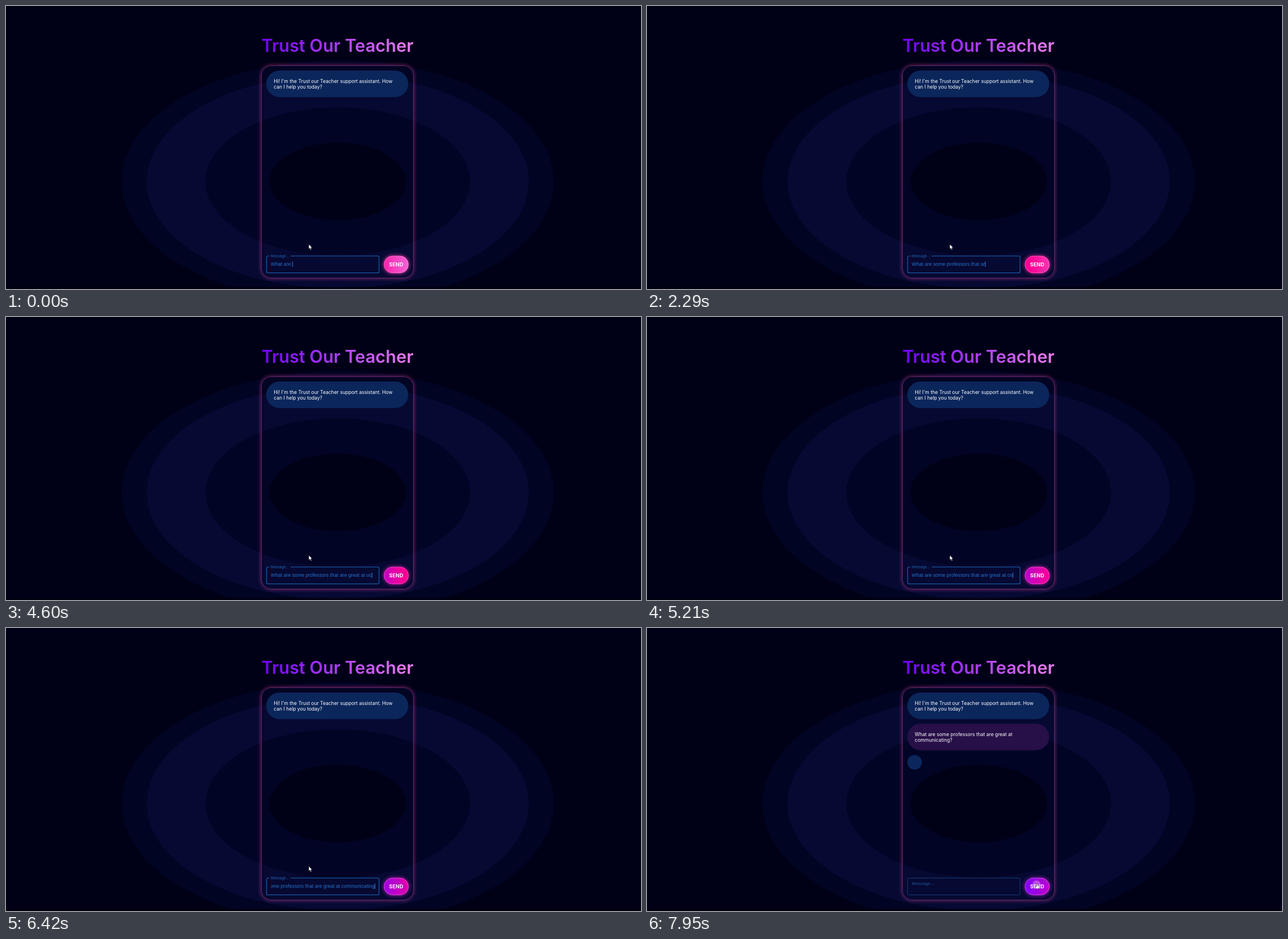
Animation, 1120 px wide and 500 px high, one loop 8000 ms. Source, as an HTML page:

```html
<!DOCTYPE html>
<html lang="en">
<head>
<meta charset="utf-8">
<title>Support chat</title>
<style>
  html, body { margin: 0; width: 100%; height: 100%; overflow: hidden; background: #000117; }
  svg { display: block; width: 1120px; height: 500px; }
  text { white-space: pre; }
  .title { font: 600 30.7px Inter, sans-serif; fill: url(#titleFill); text-anchor: middle; }
  .chat { font: 400 8.53px Inter, sans-serif; fill: #fff; }
  .field { font: 400 8.56px "Liberation Sans", Arial, sans-serif; letter-spacing: .08px; fill: #2872cc; }
  .label { font-size: 6.42px; letter-spacing: .06px; fill: #2062b4; }
  .resting { font-size: 8px; fill: #1d5597; }
  .send { font: 700 8.8px Inter, sans-serif; letter-spacing: .24px; fill: #fff; text-anchor: middle; }

  .flow, .glow, .pointer, .caret, .before, .after, .arrow, .hand { animation: 8s linear infinite; }
  .flow { animation-name: flow; }
  .glow { animation-name: glow; }
  .pointer { animation-name: travel; animation-timing-function: ease-in-out; }
  .caret { animation-name: blink; animation-timing-function: step-end; }
  .before { animation-name: before; animation-timing-function: step-end; }
  .after { animation-name: after; animation-timing-function: step-end; }
  .arrow { animation-name: arrow; animation-timing-function: step-end; }
  .hand { animation-name: hand; animation-timing-function: step-end; }

  @keyframes flow { from { transform: translateX(-112px); } to { transform: translateX(0); } }
  @keyframes glow { from { fill: #ff3fae; } 45% { fill: #f5229f; } to { fill: #b827e6; } }
  @keyframes travel {
    0%, 86% { transform: translate(534px, 421px); }
    89.8%, 91% { transform: translate(508.5px, 404.5px); }
    96.5%, 100% { transform: translate(687.5px, 451.5px); }
  }
  @keyframes blink { 0% { opacity: 1; } 87.5% { opacity: 0; } 93.75% { opacity: 1; } 100% { opacity: 1; } }
  @keyframes before { 0% { opacity: 1; } 99.3%, 100% { opacity: 0; } }
  @keyframes after { 0% { opacity: 0; } 99.3%, 100% { opacity: 1; } }
  @keyframes arrow { 0% { opacity: 1; } 95.5%, 100% { opacity: 0; } }
  @keyframes hand { 0% { opacity: 0; } 95.5%, 100% { opacity: 1; } }
</style>
</head>
<body>
<svg width="1120" height="500" viewBox="0 0 1120 500">
  <defs>
    <linearGradient id="titleFill" gradientUnits="userSpaceOnUse" x1="450" x2="719" y1="0" y2="0">
      <stop stop-color="#6e00ff"/><stop offset="1" stop-color="#ea7dec"/>
    </linearGradient>
    <linearGradient id="sendFill">
      <stop stop-color="#7f00ff"/><stop offset=".5" stop-color="#ff0090"/><stop offset="1" stop-color="#ee82ee"/>
    </linearGradient>
    <filter id="soft" x="-50%" y="-50%" width="200%" height="200%"><feGaussianBlur stdDeviation="3"/></filter>
    <clipPath id="sendClip"><rect x="666.5" y="441.5" width="43.5" height="30.5" rx="15"/></clipPath>
    <clipPath id="fieldClip"><rect x="467" y="445" width="184.5" height="24"/></clipPath>
    <mask id="outside" maskUnits="userSpaceOnUse" x="0" y="0" width="1120" height="500">
      <rect width="1120" height="500" fill="#fff"/>
      <rect x="450" y="105" width="269" height="376" rx="18"/>
    </mask>
  </defs>

  <!-- Backdrop -->
  <rect width="1120" height="500" fill="#000117"/>
  <g transform="translate(585 310)">
    <ellipse rx="381" ry="214" fill="#020424"/>
    <ellipse rx="337" ry="189" fill="#060a33"/>
    <ellipse rx="233.5" ry="131" fill="#020426"/>
    <ellipse rx="120.5" ry="68.5" fill="#000116"/>
  </g>
  <rect y="496" width="1120" height="4" fill="#00000c" opacity=".7"/>

  <text class="title" x="584.5" y="81">Trust Our Teacher</text>

  <!-- Panel -->
  <g mask="url(#outside)">
    <rect x="449" y="104" width="271" height="378" rx="19" fill="#b8348a" opacity=".55" filter="url(#soft)"/>
  </g>
  <rect x="450.5" y="105.5" width="268" height="375" rx="17.5" fill="#000019" fill-opacity=".08" stroke="#5f2860"/>

  <rect x="459" y="114" width="250.5" height="47" rx="23.5" fill="#0b265b"/>
  <text class="chat" x="472.3" y="135.6">Hi! I'm the Trust our Teacher support assistant. How</text>
  <text class="chat" x="472.3" y="145.9">can I help you today?</text>

  <g class="after">
    <rect x="459" y="169" width="250.5" height="47" rx="23.5" fill="#270f48"/>
    <text class="chat" x="472.3" y="190.6">What are some professors that are great at</text>
    <text class="chat" x="472.3" y="200.9">communicating?</text>
    <circle cx="472" cy="237.3" r="12.9" fill="#0b265b"/>
    <rect x="459.7" y="441.7" width="198.3" height="29.8" rx="2" fill="none" stroke="#1a4a8c" stroke-width=".8"/>
    <text class="field resting" x="467" y="454">Message...</text>
  </g>

  <!-- Message field -->
  <g class="before">
    <path d="M464.5 441.7H461.7a2 2 0 0 0-2 2V469.5a2 2 0 0 0 2 2H656a2 2 0 0 0 2-2V443.7a2 2 0 0 0-2-2H502" fill="none" stroke="#1c66b8" stroke-width="1.1"/>
    <text class="field label" x="467" y="443.6">Message...</text>
    <g clip-path="url(#fieldClip)">
      <g id="line">
        <text class="field" id="typed" x="467" y="459.4"></text>
        <rect class="caret" id="caret" y="451.5" width=".9" height="9.6" fill="#3f8be0"/>
      </g>
    </g>
  </g>

  <!-- Send button -->
  <rect class="glow" x="665.5" y="440.5" width="45.5" height="32.5" rx="16" opacity=".65" filter="url(#soft)"/>
  <g clip-path="url(#sendClip)">
    <rect class="flow" x="666" y="441" width="176" height="32" fill="url(#sendFill)"/>
  </g>
  <rect x="667" y="442" width="42.5" height="29.5" rx="14.7" fill="none" stroke="#ff8fdc" stroke-opacity=".5"/>
  <text class="send" x="688.2" y="459.8">SEND</text>
  <circle class="after" cx="687" cy="453" r="7" fill="#fff" fill-opacity=".3"/>

  <!-- Pointer -->
  <g class="pointer" fill="#fff" stroke="#000" stroke-width=".5">
    <path class="arrow" d="M0 0V8.4L2 6.6 3.4 9.7 4.9 9 3.5 6H6.1Z"/>
    <path class="hand" d="M-.8.6Q0-.4.8.6V3.6L4 4.4Q4.8 4.8 4.5 6L3.6 9.2H-.6L-3 5.8Q-2.8 4.6-1.8 5L-.8 5.8Z"/>
  </g>
</svg>
<script>
  const LOOP = 8000, LEFT = 467, RIGHT = 650.3;
  const message = "What are some professors that are great at communicating?";
  // [time in ms, letters typed]
  const pace = [[0, 9], [1050, 17], [2290, 32], [4350, 43], [4880, 43], [5700, 50], [6500, 57], [LOOP, 57]];
  const slips = [[4460, "o"], [4590, "oc"], [4740, "o"], [4870, ""]];
  const [line, typed, caret] = ["line", "typed", "caret"].map(id => document.getElementById(id));

  function textAt(t) {
    const i = pace.findIndex(([time]) => time > t);
    const [t0, n0] = pace[i - 1], [t1, n1] = pace[i];
    const count = Math.floor(n0 + (n1 - n0) * (t - t0) / (t1 - t0));
    const slip = slips.filter(([time]) => time <= t).pop();
    return message.slice(0, count) + (slip ? slip[1] : "");
  }

  const start = performance.now();
  let shown = null;
  function draw() {
    const text = textAt((performance.now() - start) % LOOP);
    if (text !== shown) {
      typed.textContent = shown = text;
      const end = LEFT + typed.getComputedTextLength();
      caret.setAttribute("x", end);
      line.setAttribute("transform", `translate(${Math.min(0, RIGHT - end)} 0)`);
    }
    requestAnimationFrame(draw);
  }
  draw();
</script>
</body>
</html>
```
